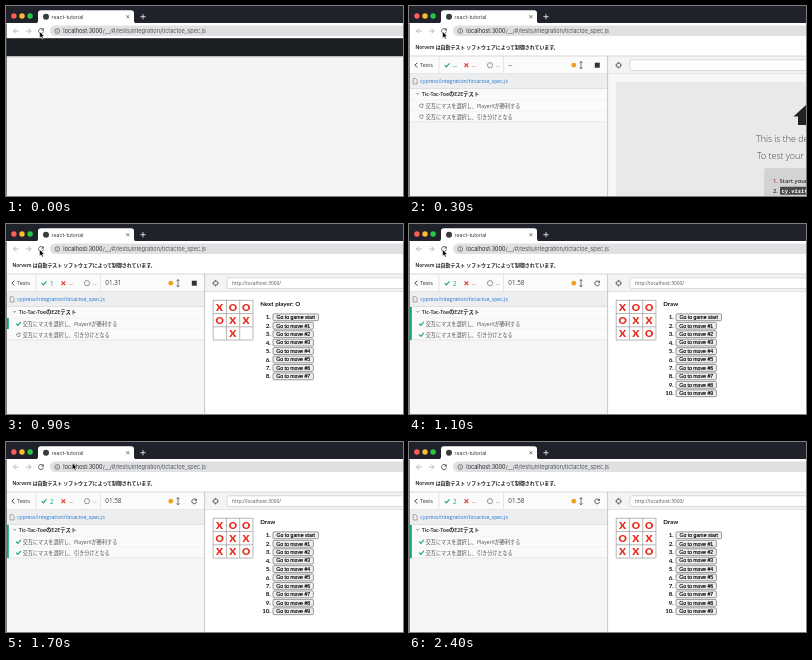
Write an HTML page that moves like this. It is 397 px wide and 190 px high and loops after 2500 ms.

```html
<!DOCTYPE html>
<html lang="ja">
<head>
<meta charset="utf-8">
<title>Test run</title>
<style>
html, body { margin: 0; width: 100%; height: 100%; overflow: hidden; }
svg { display: block; width: 100vw; height: 100vh; }
text { white-space: pre; }
.ui { font-family: Inter, "Noto Sans CJK JP", "Noto Sans CJK", sans-serif; }
.runner { font-family: "Open Sans", "Noto Sans CJK JP", "Noto Sans CJK", sans-serif; }
.game { font-family: Lato, sans-serif; font-weight: 700; }
.button { font-family: "Liberation Sans", Arial, sans-serif; stroke: #000; stroke-width: .15; }
.code { font-family: "Noto Sans Mono", monospace; font-weight: 600; }
</style>
</head>
<body>
<svg id="stage" viewBox="0 0 397 190"></svg>
<script>
const STEP = 100, LOOP = 2500;
const GREEN = '#13a37c', RED = '#e0352b', GREY = '#8b8b8b';
const FIRST_GAME = [0, 1, 4];
const DRAWN_GAME = [0, 1, 4, 2, 5, 3, 7, 8, 6];
const stage = document.getElementById('stage');

const rect = (x, y, w, h, fill, extra = '') =>
  `<rect x="${x}" y="${y}" width="${w}" height="${h}" fill="${fill}" ${extra}/>`;
const circle = (x, y, r, fill, extra = '') =>
  `<circle cx="${x}" cy="${y}" r="${r}" fill="${fill}" ${extra}/>`;
const line = (d, color, width = .8) =>
  `<path d="${d}" fill="none" stroke="${color}" stroke-width="${width}"/>`;
const text = (x, y, size, str, fill, kind = 'ui', extra = '') =>
  `<text x="${x}" y="${y}" font-size="${size}" fill="${fill}" class="${kind}" ${extra}>${str}</text>`;
const ring = (x, y, r, color, width = .8) =>
  circle(x, y, r, 'none', `stroke="${color}" stroke-width="${width}"`);
const check = (x, y) => line(`M${x - 2.2} ${y}l1.6 1.7 3-3.6`, GREEN, 1.1);
const cross = (x, y, s, color, width) =>
  line(`M${x - s} ${y - s}l${2 * s} ${2 * s}m0 ${-2 * s}l${-2 * s} ${2 * s}`, color, width);
const reload = (x, y, r, color, width = .9) =>
  line(`M${x + r * .8} ${y - r * .6}A${r} ${r} 0 1 0 ${x + r} ${y + r * .2}`, color, width) +
  `<path d="M${x + r * 1.1} ${y - r * 1.2}v${r}h${-r}z" fill="${color}"/>`;

function browser() {
  return rect(0, 0, 397, 17.5, '#20222b') +
    ['#ff5d55', '#fdbc2f', '#2ac840'].map((c, i) => circle(7.9 + i * 8.1, 10, 2.7, c)).join('') +
    '<path d="M29 17.5Q32 17.5 32 14.5V7Q32 4.2 35 4.2H125Q128 4.2 128 7V14.5Q128 17.5 131 17.5Z" fill="#fff"/>' +
    circle(40, 10.7, 3, '#3a3a3a') +
    text(45.6, 12.7, 5.2, 'react-tutorial', '#36383c') +
    cross(121.8, 10.7, 1.5, '#555', .8) +
    line('M134.4 10.7h5.2m-2.6 -2.6v5.2', '#e5e5e8', .9) +
    rect(0, 17, 397, 15.2, '#fff') +
    rect(44, 19.5, 370, 10.6, '#dfe0e1', 'rx="5.3"') +
    line('M7.5 25h5.2M10.1 22.4L7.5 25l2.6 2.6M19.9 25h5.2M22.5 22.4l2.6 2.6-2.6 2.6', '#a9abb0') +
    reload(35, 25, 2.5, '#4c4f54') +
    ring(51.3, 25, 2.4, '#5c5f64', .7) + line('M51.3 24.6v1.8M51.3 23.4v.6', '#5c5f64', .7) +
    text(57.3, 26.9, 5.57, 'localhost:3000<tspan fill="#505358">/__/#/tests/integration/tictactoe_spec.js</tspan>', '#24262a');
}

function blankPage() {
  return rect(0, 32, 397, 158, '#f4f4f4') + rect(0, 32, 397, 18, '#1b1e23') +
    rect(0, 50, 397, 1, '#b9babb') + rect(0, 51, 397, 1, '#e6e6e6');
}

function header(s) {
  const full = !s.loading;
  const shift = full ? 0 : -15;
  let out = rect(0, 50, 198.5, 18, '#fbfbfb') + rect(198.5, 50, 199, 18, '#f4f4f4') +
    line('M0 67.8H397', '#d2d2d2', .7) +
    line('M8.2 56.8l-2.3 2.4 2.3 2.4', '#333', .9);
  if (full) out += text(11, 61.2, 5.5, 'Tests', '#333', 'runner');
  out += line(`M${full ? 30 : 16} 50V67`, '#ddd', .7) +
    check(38 + shift, 59.2) +
    text(44 + shift, 61.5, 6.3, s.passed || '--', GREEN, 'runner') +
    cross(full ? 57.4 : 41, 59.2, 1.9, RED, 1.1) +
    text(full ? 63 : 46, 61.5, 6, '--', RED, 'runner') +
    ring(full ? 81 : 60, 59.2, 2.6, GREY, .9) +
    text(full ? 87 : 66, 61.5, 6, '--', GREY, 'runner');
  if (full) out += line('M94.5 50V67', '#ddd', .7) + text(99.3, 61.4, 6.3, s.clock, '#444', 'runner');
  out += circle(164.8, 59.2, 2.4, '#f0a020') +
    line('M172 55.5v7.4M170.6 57.1l1.4-1.6 1.4 1.6M170.6 61.3l1.4 1.6 1.4-1.6', '#6b6558', .9) +
    (s.running ? rect(185.8, 56.7, 5, 5, '#333') : reload(188.2, 59.3, 2.4, '#444')) +
    ring(209.6, 59.2, 2.3, '#555', .8) +
    line('M206.2 59.2h2.2m2.4 0h2.2M209.6 55.8v2.2m0 2.4v2.2', '#555', .7) +
    rect(221, 53.8, 190, 10.8, '#fff', `rx="${s.loading ? 5 : 2}" stroke="#c9c9c9" stroke-width=".7"`);
  if (s.game) out += text(226, 61, 4.9, 'http://localhost:3000/', '#555', 'runner');
  return out;
}

function loader() {
  return ['#34a583', '#4384c4', '#d95748', '#e7a14c', '#a2a2a2']
    .map((c, i) => circle(75 + i * 12.1, 112.5, 4.1, c)).join('') +
    text(55, 137.5, 8.15, 'Your tests are loading...', '#333', 'runner');
}

function testList(s) {
  const names = ['交互にマスを選択し、PlayerXが勝利する', '交互にマスを選択し、引き分けとなる'];
  const barTop = s.passed === 2 ? 83 : 94;
  return rect(0, 83, 198, 33, '#fafafa') +
    line('M0 94H198M0 105H198', '#eaeaea', .5) + line('M0 115.9H198', '#d8d8d8', .6) +
    rect(.8, barTop, 2, s.passed ? 94 + s.passed * 11 - barTop : 0, GREEN) +
    line('M7.2 86.8l1.5 1.6 1.5-1.6', '#666', .7) +
    text(12.8, 89.6, 5.3, 'Tic-Tac-ToeのE2Eテスト', '#222', 'runner', 'font-weight="600"') +
    names.map((name, i) => {
      const y = 99.7 + i * 11;
      return (i < s.passed ? check(12.4, y) : reload(12.4, y, 1.8, '#666', .7)) +
        text(16.7, y + 2, 5.14, name, '#505050', 'runner');
    }).join('');
}

function defaultPage() {
  return rect(199, 68, 198, 122, '#f7f7f7') +
    rect(207, 76, 200, 130, '#e9e9e9', 'rx="3"') +
    '<path d="M384.5 110.5L397 99V119H389V110.5Z" fill="#222"/>' +
    text(347, 136.2, 8.9, 'This is the default page', '#444', 'runner', 'font-weight="300"') +
    text(348, 153.2, 8.9, 'To test your web app:', '#444', 'runner', 'font-weight="300"') +
    rect(355, 162, 50, 40, '#d3d3d3', 'rx="3"') +
    text(364, 177, 5.8, '<tspan fill="#b33">1.</tspan> Start your server', '#333', 'runner', 'font-weight="600"') +
    text(364, 187, 5.8, '2.', '#333', 'runner', 'font-weight="600"') +
    rect(371, 180.7, 40, 8, '#4a4a4a', 'rx="1"') +
    text(372.5, 186.8, 5.4, 'cy.visit()', '#fff', 'code');
}

function gamePage(moves) {
  const cell = 13.25;
  let out = rect(199, 68, 198, 122, '#fff');
  for (let i = 0; i < 4; i++) {
    const p = i * cell;
    out += line(`M207 ${76.3 + p}h${3 * cell}M${207.2 + p} 76v${3 * cell}`, '#999', .7);
  }
  moves.forEach((pos, i) => {
    out += text(213.6 + pos % 3 * cell, 86.5 + Math.floor(pos / 3) * cell, 10.2, 'XO'[i % 2], '#e52c1e',
      'game', 'text-anchor="middle" style="font-weight:900"');
  });
  const status = moves.length === 9 ? 'Draw' : 'Next player: ' + 'XO'[moves.length % 2];
  out += text(254.2, 81.8, 6.2, status, '#111', 'game');
  for (let i = 0; i <= moves.length; i++) {
    const y = 93.3 + i * 8.44, w = i ? 40.4 : 45.5;
    out += text(264.8, y + 2.1, 6.2, i + 1 + '.', '#111', 'game', 'text-anchor="end"') +
      rect(267, y - 3.4, w, 6.8, '#efefef', 'rx="1" stroke="#707070" stroke-width=".7"') +
      text(267 + w / 2, y + 1.8, 5.2, i ? 'Go to move #' + i : 'Go to game start', '#000', 'button', 'text-anchor="middle"');
  }
  return out;
}

function runnerPage(s) {
  return rect(0, 32, 397, 18, '#fff') +
    text(6.6, 42.8, 4.92, 'Norvem は自動テスト ソフトウェアによって制御されています。', '#1c1c1c', 'ui', 'font-weight="600"') +
    rect(0, 50, 199, 140, '#f5f5f5') + header(s) + line('M0 50H397', '#c8c8c8', .7) +
    rect(0, 68, 198.5, 14.7, '#eceef0') + line('M0 82.5H198', '#d6d6d6', .6) +
    line('M4.2 72.6h2.5l1.4 1.4v4h-3.9z', '#777', .6) +
    text(11.3, 77.3, 5.2, 'cypress/integration/tictactoe_spec.js', '#2273cf', 'runner') +
    (s.loading ? loader() : testList(s)) +
    (s.game ? gamePage(s.game) : defaultPage()) +
    line('M198.6 50V190', '#bdbdbd', .8);
}

function cursor(t) {
  const k = Math.max(0, (t - 1600) / 400);
  const x = 33.6 + k * 131, y = 25.6 - k * 18;
  return k > 1 ? '' :
    `<path transform="translate(${x} ${y})" d="M0 0V6.4L1.5 5.1 2.6 7.5 3.7 7 2.7 4.7H4.7Z" fill="#000" stroke="#fff" stroke-width=".5"/>`;
}

// The run's clock advances 2.25 times as fast as the loop.
function stateAt(t) {
  const seconds = Math.min(1.58, Math.max(0, .41 + (t - 500) * .00225));
  const s = {
    loading: t < 300,
    running: t >= 300 && seconds < 1.58,
    passed: t < 500 ? 0 : seconds < 1.58 ? 1 : 2,
    clock: t < 400 ? '--' : seconds.toFixed(2).padStart(5, '0')
  };
  if (t >= 500) s.game = DRAWN_GAME.slice(0, Math.round((t - 500) / 400 * 7));
  else if (t >= 400) s.game = FIRST_GAME;
  return s;
}

function draw(t) {
  stage.innerHTML = (t < 100 ? blankPage() : runnerPage(stateAt(t))) +
    browser() + rect(0, 17.5, .7, 172.5, '#4a4d52') + cursor(t);
}

let shown = -1;
function tick() {
  const t = Math.floor(performance.now() % LOOP / STEP) * STEP;
  if (t !== shown) draw(shown = t);
  requestAnimationFrame(tick);
}
tick();
</script>
</body>
</html>
```
